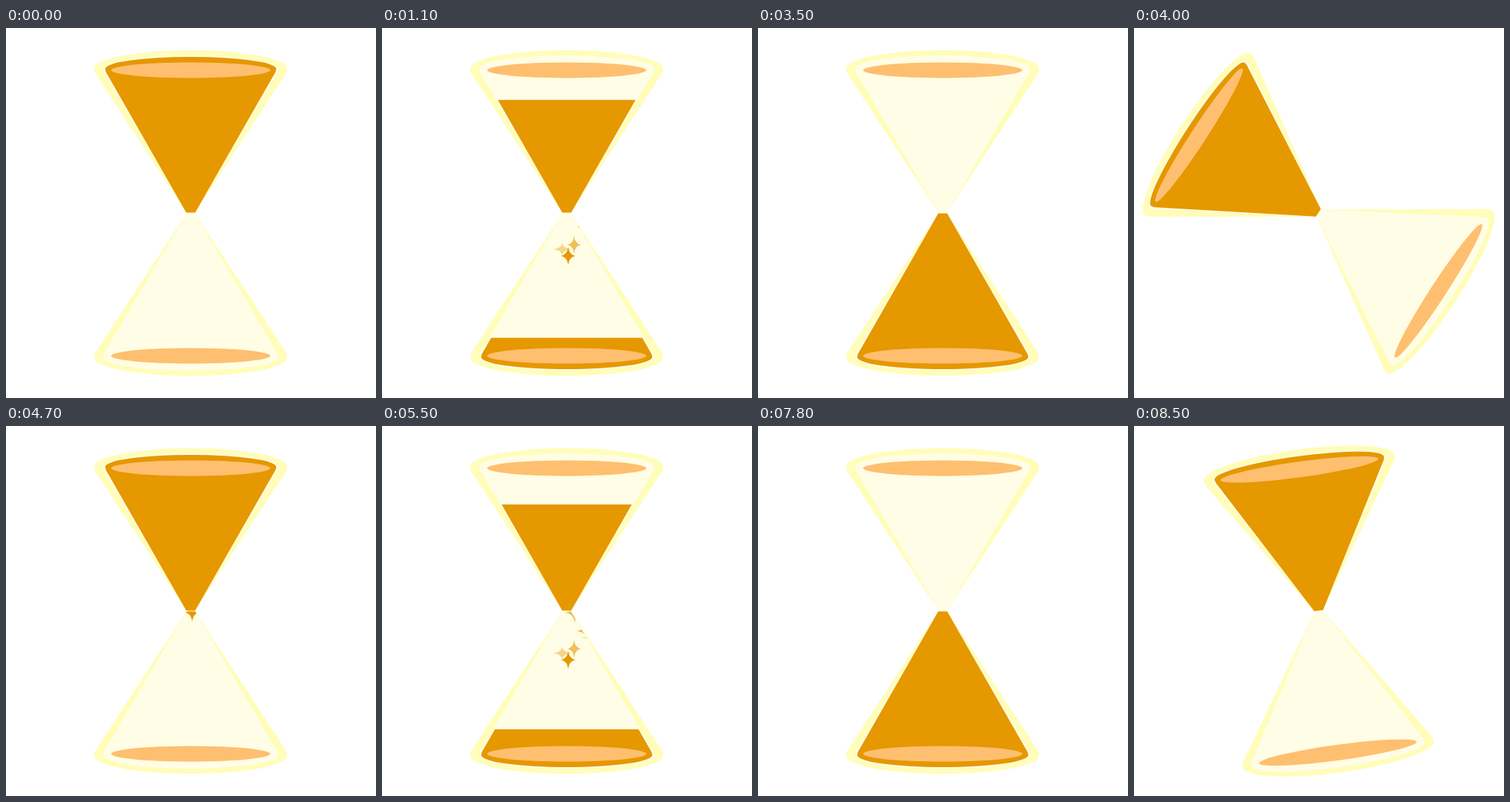
An HTML page with a canvas that plays this animation: 500 px wide and 500 px high, repeating every 8610 ms.

```html
<!DOCTYPE html>
<html lang="en">
<head>
<meta charset="utf-8">
<title>Hourglass</title>
<style>
html, body { margin: 0; width: 100%; height: 100%; overflow: hidden; background: #fff; }
canvas { display: block; }
</style>
</head>
<body>
<canvas width="500" height="500"></canvas>
<script>
const ctx = document.querySelector('canvas').getContext('2d');
const LOOP = 8610, STEP = 100, CYCLE = 4300, TURN_START = 3500;
const FALL = 250 / 2828;      // level speed, px per ms
const FILL_DELAY = 180, STAR_SPEED = 0.08;
const SAND = '#e59800', RIM = '#ffbf70', CREAM = '#fffde5', GLASS = '#fffdb8';

// Upper cone around the origin; the lower one is its mirror image.
const cone = (w, side, rim, neck) => new Path2D(
  `M${-neck} -.5 L${3.5 - w} ${side + 9} Q${-w} ${side + 4} ${-w} ${side}
   A${w} ${side - rim} 0 0 1 ${w} ${side}
   Q${w} ${side + 4} ${w - 3.5} ${side + 9} L${neck} -.5 Z`);
const outer = cone(130.5, -195, -220, 6);
const inner = cone(118.5, -195, -213, 6);
const body = cone(115.5, -195, -211, 6);

// x, y (at 1900 ms), horizontal reach, vertical reach, opacity
const stars = [
  [2, 122, 10, 12, 1],
  [10, 107, 9, 12, .6],
  [-6, 113, 12, 8, .4],
  [44, 92, 24, 10, .55],
  [31.5, 83, 18, 17, .7],
  [11, 58, 13, 14, .6],
  [14.5, 41, 19, 23, .75],
  [-24, 38, 8, 4, .45],
  [0, 22, 3, 3, .7],
  [13, 20, 5, 6, .35]
];

function drawStar([x, y, rx, ry, alpha], drop) {
  y += drop;
  const kx = rx * .13, ky = ry * .13;
  ctx.globalAlpha = alpha;
  ctx.beginPath();
  ctx.moveTo(x, y - ry);
  ctx.quadraticCurveTo(x + kx, y - ky, x + rx, y);
  ctx.quadraticCurveTo(x + kx, y + ky, x, y + ry);
  ctx.quadraticCurveTo(x - kx, y + ky, x - rx, y);
  ctx.quadraticCurveTo(x - kx, y - ky, x, y - ry);
  ctx.fill();
  ctx.globalAlpha = 1;
}

function scoped(draw) {
  ctx.save();
  draw();
  ctx.restore();
}

function fill(path, color) {
  ctx.fillStyle = color;
  ctx.fill(path);
}

function half(flip, paint) {
  scoped(() => {
    ctx.scale(1, flip);
    fill(outer, GLASS);
    fill(inner, CREAM);
    scoped(() => {
      ctx.clip(body);
      ctx.scale(1, flip);
      ctx.fillStyle = SAND;
      paint();
    });
    ctx.fillStyle = RIM;
    ctx.beginPath();
    ctx.ellipse(0, -193, 107.5, 10.5, 0, 0, Math.PI * 2);
    ctx.fill();
  });
}

function render(t) {
  const turn = Math.max(0, (t - TURN_START) / (CYCLE - TURN_START));
  const upper = Math.min(0, t * FALL - 250);
  const lower = Math.max(0, 250 - Math.max(0, t - FILL_DELAY) * FALL);
  const drop = (t - 1900) * STAR_SPEED;

  ctx.clearRect(0, 0, 500, 500);
  scoped(() => {
    ctx.translate(249.6, 250);
    ctx.rotate(Math.PI * turn * turn * (3 - 2 * turn));
    half(1, () => ctx.fillRect(-130, upper, 260, -upper));
    half(-1, () => {
      if (lower > 0) stars.forEach(star => drawStar(star, drop));
      ctx.fillRect(-130, lower, 260, 250 - lower);
    });
  });
}

function frame() {
  const time = Math.floor(performance.now() % LOOP / STEP) * STEP;
  render(Math.min(time, 8500) % CYCLE);
  requestAnimationFrame(frame);
}
frame();
</script>
</body>
</html>
```
